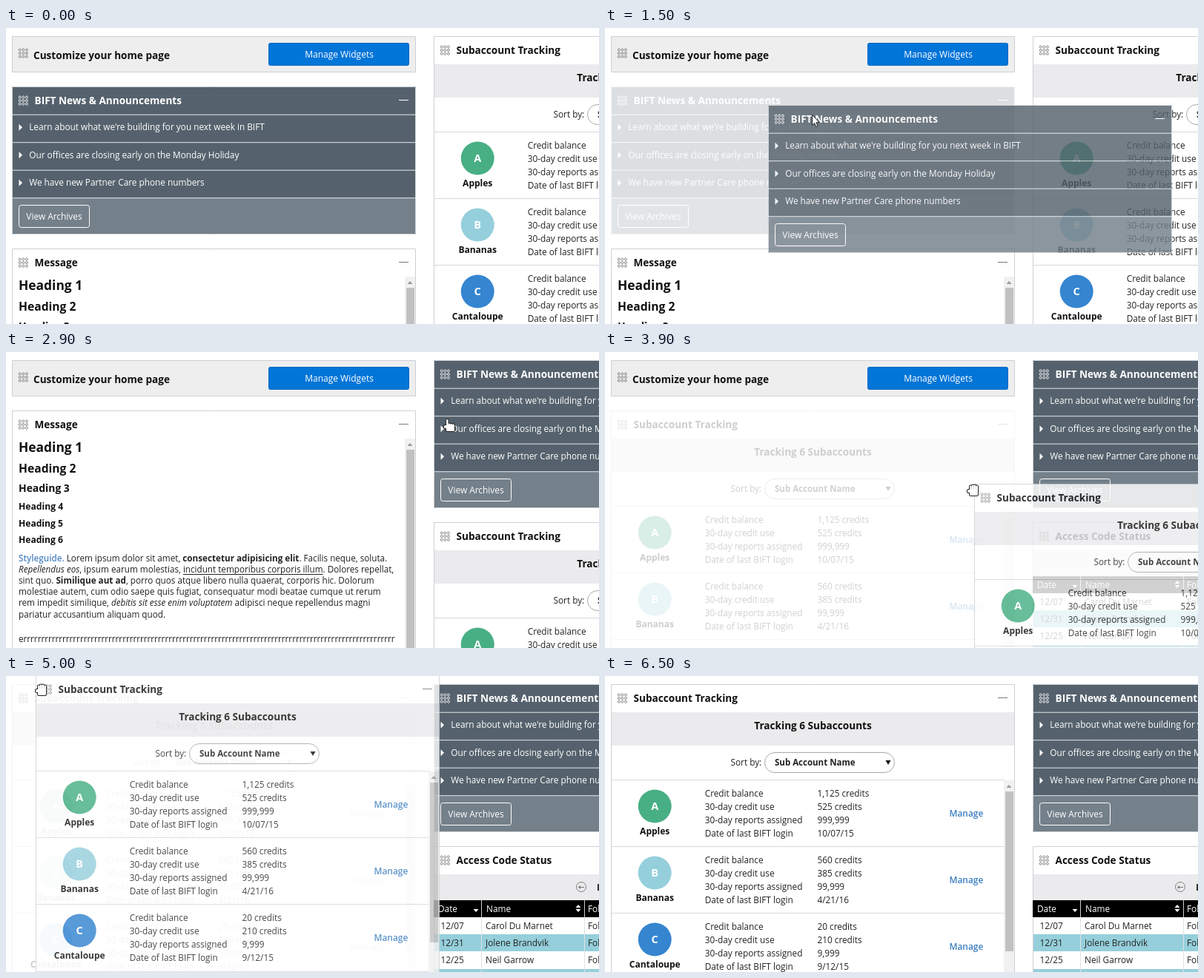
An HTML page with a canvas that plays this animation: 800 px wide and 400 px high, repeating every 6.9 s.

```html
<!DOCTYPE html>
<html lang="en">
<head>
<meta charset="utf-8">
<title>Dashboard widgets</title>
<style>
html, body { margin: 0; width: 100%; height: 100%; overflow: hidden; background: #fff; }
canvas { display: block; }
</style>
</head>
<body>
<canvas id="stage" width="800" height="400"></canvas>
<script>
const LOOP = 6900, STEP = 100, W = 545, GAP = 19, LEAD = 65;
const LEFT = 8, RIGHT = 577, TOP = 11;
const SLATE = '#55626d', BORDER = '#cdd0d4', BAND = '#ebebed', INK = '#222';
const stage = document.getElementById('stage').getContext('2d');
const layer = Object.assign(document.createElement('canvas'), { width: W, height: 460 }).getContext('2d');
let g = stage;

function rect(x, y, w, h, fill) {
  g.fillStyle = fill;
  g.fillRect(x, y, w, h);
}

function paint(fill, stroke, width = 1) {
  if (fill) { g.fillStyle = fill; g.fill(); }
  if (stroke) { g.strokeStyle = stroke; g.lineWidth = width; g.stroke(); }
}

function rounded(x, y, w, h, r, fill, stroke) {
  g.beginPath();
  g.roundRect(x + .5, y + .5, w - 1, h - 1, r);
  paint(fill, stroke);
}

function disc(x, y, r, fill, stroke) {
  g.beginPath();
  g.arc(x, y, r, 0, 7);
  paint(fill, stroke, .9);
}

function poly(points, fill, stroke) {
  g.beginPath();
  points.forEach(([x, y]) => g.lineTo(x, y));
  g.closePath();
  paint(fill, stroke);
}

// Arrowheads from base to tip; a negative length flips them.
const arrowV = (x, y, w, len, fill) => poly([[x - w / 2, y], [x + w / 2, y], [x, y + len]], fill);
const arrowH = (x, y, h, len, fill) => poly([[x, y - h / 2], [x, y + h / 2], [x + len, y]], fill);

function text(str, x, y, color = INK, size = 11.8, style = '', align = 'left') {
  g.font = `${style} ${size}px "Open Sans", "Noto Sans", sans-serif`;
  g.fillStyle = color;
  g.textAlign = align;
  g.fillText(str, x, y);
  return g.measureText(str).width;
}

const bold = (str, x, y, color = '#111', size = 13.6, align) => text(str, x, y, color, size, 'bold', align);

function box(h, fill) {
  rect(0, 0, W, h, fill);
  rounded(0, 0, W, h, 0, null, BORDER);
}

function grip(y, color) {
  for (let i = 0; i < 9; i++) disc(10.7 + i % 3 * 4.6, y + (i / 3 | 0) * 4.6, 1.5, null, color);
}

function panel(h, fill, title, ink = '#111', mark = '#777') {
  box(h, fill);
  grip(14.5, mark);
  bold(title, 30.5, 24, ink);
  rect(522, 18, 13, 1, mark);
}

function scrollbar(y, h, thumb) {
  rect(530, y, 14, h, '#f1f1f1');
  arrowV(537, y + 10, 7, -4, '#999');
  rect(532, y + 15, 11, thumb, '#c1c1c1');
}

function customize() {
  box(49, '#eeeeef');
  grip(18.5, '#777');
  bold('Customize your home page', 29, 31);
  rounded(346, 9, 190, 31, 2, '#0275d8', '#0269c2');
  text('Manage Widgets', 441.5, 29, '#fff', 12, '', 'center');
}

const ITEMS = [
  "Learn about what we're building for you next week in BIFT",
  'Our offices are closing early on the Monday Holiday',
  'We have new Partner Care phone numbers'
];

function news() {
  panel(200, SLATE, 'BIFT News & Announcements', '#fff', '#fff');
  rect(1, 151, W - 2, 48, '#74808a');
  rect(0, 150.2, W, 1, '#e4e7e9');
  ITEMS.forEach((item, i) => {
    const y = 37.7 + i * 37.5;
    rect(0, y, W, 1, '#e4e7e9');
    arrowH(9.5, y + 17.5, 9, 4.5, '#fff');
    text(item, 23.2, y + 21.3, '#fff');
  });
  rounded(9, 160, 96, 31, 3, null, '#fff');
  text('View Archives', 57, 180, '#fff', 11.9, '', 'center');
}

// A leading mark sets the style of a run.
const STYLES = { '#': '600', '*': 'bold', '/': 'italic', '_': '' };
const LOREM = [
  ['#Styleguide.', ' Lorem ipsum dolor sit amet, ', '*consectetur adipisicing elit', '. Facilis neque, soluta.'],
  ['/Repellendus eos', ', ipsum earum molestias, ', '_incidunt temporibus corporis illum', '. Dolores repellat,'],
  ['sint quo. ', '*Similique aut ad', ', porro quos atque libero nulla quaerat, corporis hic. Dolorum'],
  ['molestiae autem, cum odio saepe quis fugiat, consequatur modi beatae cumque ut rerum'],
  ['rem impedit similique, ', '/debitis sit esse enim voluptatem', ' adipisci neque repellendus magni'],
  ['pariatur accusantium aliquam quod.']
];

function message() {
  panel(420, '#fff', 'Message');
  for (let i = 0, y = 56; i < 6; i++) {
    const size = Math.max(12.1, 17.4 - 1.75 * i);
    bold('Heading ' + (i + 1), 9, y, '#111', size);
    y += size + 10.4;
  }
  LOREM.forEach((runs, i) => {
    let x = 9;
    const y = 204 + i * 15.1;
    for (const run of runs) {
      const mark = run[0], marked = mark in STYLES;
      const w = text(marked ? run.slice(1) : run, x, y, mark === '#' ? '#5186c2' : INK, 11.7, marked ? STYLES[mark] : '');
      if (mark === '_') rect(x, Math.round(y + 2), w, 1, INK);
      x += w;
    }
  });
  text('e' + 'r'.repeat(105), 9, 313, INK, 11.7);
  scrollbar(38, 381, 330);
}

const ACCOUNTS = [
  ['Apples', '#48af84', '1,125 credits', '525 credits', '999,999', '10/07/15'],
  ['Bananas', '#95cfdc', '560 credits', '385 credits', '99,999', '4/21/16'],
  ['Cantaloupe', '#3585d0', '20 credits', '210 credits', '9,999', '9/12/15']
];
const LABELS = ['Credit balance', '30-day credit use', '30-day reports assigned', 'Date of last BIFT login'];

function subaccounts() {
  panel(460, '#fff', 'Subaccount Tracking');
  rect(1, 38, W - 2, 45, BAND);
  bold('Tracking 6 Subaccounts', 272.5, 61, '#111', 13.6, 'center');
  text('Sort by:', 161.5, 110);
  rounded(207, 92, 176, 28, 14, '#fff', '#a9a9a9');
  bold('Sub Account Name', 221, 110, INK, 11.5);
  arrowV(374, 103, 7, 6, '#111');
  ACCOUNTS.forEach(([name, color, ...values], i) => {
    const y = 129 + i * 90;
    rect(1, y, 530, 1, '#d6d8dc');
    disc(59.2, y + 36, 22.5, color);
    bold(name[0], 59.2, y + 41, '#fff', 14.5, 'center');
    bold(name, 59.2, y + 74, '#111', 12, 'center');
    LABELS.forEach((label, k) => {
      text(label, 126.7, y + 23 + k * 17.9);
      text(values[k], 278.5, y + 23 + k * 17.9);
    });
    text('Manage', 456.5, y + 50, '#3b7fc0', 11.9, '600');
  });
  rect(1, 400, 530, 1, '#d6d8dc');
  scrollbar(130, 329, 216);
}

const CODES = [['12/07', 'Carol Du Marnet'], ['12/31', 'Jolene Brandvik'], ['12/25', 'Neil Garrow'], ['12/18', 'Wilma Tarrant']];

function accessCodes() {
  panel(300, '#fff', 'Access Code Status');
  rect(1, 38, W - 2, 35, BAND);
  disc(199, 55, 6.5, null, '#777');
  rect(196, 55, 7, 1, '#777');
  arrowH(198, 55.5, 5, -3, '#777');
  bold('Last 30 days', 220, 60, INK, 12);
  rect(0, 73, W, 23, '#000');
  text('Date', 6, 89, '#fff');
  text('Name', 71, 89, '#fff');
  text('Follow-up', 208, 89, '#fff');
  arrowV(57, 85, 7, 4, '#fff');
  arrowV(195, 83, 7, -4, '#fff');
  arrowV(195, 85, 7, 4, '#fff');
  CODES.forEach(([date, name], i) => {
    const y = Math.round(96 + i * 23.2);
    rect(1, y, W - 2, 23, i % 2 ? '#95cfdb' : '#fff');
    text(date, 9.5, y + 16);
    text(name, 70, y + 16);
    text('Follow up', 208, y + 16);
  });
  for (const x of [64, 203]) {
    rect(x, 73, 1, 23, '#ccc');
    rect(x, 96, 1, 92, '#dfe3e6');
  }
}

const HEIGHTS = new Map([[customize, 49], [news, 200], [message, 420], [subaccounts, 460], [accessCodes, 300]]);

const LAYOUTS = [
  { from: 0, left: [customize, news, message], right: [subaccounts, accessCodes] },
  { from: 2200, left: [customize, message], right: [news, subaccounts, accessCodes] },
  { from: 3900, left: [customize, subaccounts, message], right: [news, accessCodes] },
  { from: 4800, left: [subaccounts, customize, message], right: [news, accessCodes] }
];

// Key points are [time, x, y].
const DRAGS = [
  { widget: news, keys: [[1200, LEFT, 79], [1500, 220, 104], [1900, 471, 26], [2400, RIGHT, TOP]] },
  { widget: subaccounts, keys: [[3300, RIGHT, 230], [4500, 328, 84], [5000, 40, -1], [5500, LEFT, TOP]] }
];

const easeIn = k => k ** 1.5;
const easeOut = k => 1 - (1 - k) ** 1.5;
const GLIDES = [
  { from: 100, to: 850, a: [765, 362], b: [22, 97], ease: easeOut },
  { from: 2600, to: 3300, a: [591, 29], b: [591, 248], ease: easeIn, hand: true },
  { from: 5500, to: 6500, a: [22, 29], b: [806, 190], ease: easeOut }
];

// Smooth path through the keys without overshoot, at rest at both ends.
function along(keys, t) {
  const last = keys.length - 1;
  t = Math.min(t, keys[last][0]);
  const i = Math.min(last - 1, keys.findLastIndex(key => key[0] <= t));
  const span = keys[i + 1][0] - keys[i][0], s = (t - keys[i][0]) / span;
  const slope = (j, n) => (keys[j + 1][n] - keys[j][n]) / (keys[j + 1][0] - keys[j][0]);
  const tangent = (j, n) => {
    if (j === 0 || j === last) return 0;
    const a = slope(j - 1, n), b = slope(j, n);
    return a * b > 0 ? 2 * a * b / (a + b) : 0;
  };
  return [1, 2].map(n => Math.round(
    keys[i][n] + (keys[i + 1][n] - keys[i][n]) * s * s * (3 - 2 * s) +
    span * s * (1 - s) * (tangent(i, n) * (1 - s) - tangent(i + 1, n) * s)));
}

function arrow() {
  poly([[.5, .5], [.5, 14.5], [3.7, 11.5], [5.8, 16.5], [8, 15.5], [5.9, 10.7], [10.3, 10.7]], '#fff', INK);
}

// A dark pass one pixel wider gives the hand its outline.
function hand(fingerTop) {
  for (const [grow, fill] of [[1, INK], [0, '#fff']]) {
    g.beginPath();
    const part = (x, y, w, h) => g.roundRect(x - grow, y - grow, w + 2 * grow, h + 2 * grow, 1.5 + grow);
    for (let i = 0; i < 4; i++) part(3 + i * 2.8, fingerTop(i), 2.6, 8);
    part(3, 8, 11, 9);
    part(0, 9, 5, 4);
    paint(fill);
  }
}

const point = () => hand(i => i ? 6 + i * .5 : 1);

function grab() {
  g.translate(-7, -9);
  hand(i => 2 + Math.abs(i - 1.5));
}

function place(shape, x, y, alpha = 1) {
  if (alpha === 1) {
    g.save();
    g.translate(x, y);
    shape();
    g.restore();
    return;
  }
  layer.clearRect(0, 0, W, 460);
  g = layer;
  shape();
  g = stage;
  g.globalAlpha = alpha;
  g.drawImage(layer.canvas, x, y);
  g.globalAlpha = 1;
}

// The pointer runs ahead of the widget it drags.
function pointer(t, drag) {
  if (drag) {
    const [x] = along(drag.keys, t), [px, py] = along(drag.keys, t + LEAD);
    place(Math.abs(px - x) < 26 ? grab : arrow, px + 14, py + 18);
    return;
  }
  const glide = GLIDES.findLast(gl => t >= gl.from);
  if (!glide) return;
  const k = glide.ease(Math.min(1, (t - glide.from) / (glide.to - glide.from)));
  const [x, y] = glide.a.map((v, n) => Math.round(v + (glide.b[n] - v) * k));
  place(glide.hand ? point : arrow, x, y);
}

function draw(t) {
  rect(0, 0, 800, 400, '#fff');
  const drag = DRAGS.find(({ keys }) => t >= keys[0][0] && t < keys.at(-1)[0] + STEP * 2 && t < keys.at(-1)[0]);
  const layout = LAYOUTS.findLast(l => t >= l.from);
  for (const [column, x] of [[layout.left, LEFT], [layout.right, RIGHT]]) {
    let y = TOP;
    for (const widget of column) {
      if (y < 400) place(widget, x, y, drag?.widget === widget ? .2 : 1);
      y += HEIGHTS.get(widget) + GAP;
    }
  }
  if (drag) place(drag.widget, ...along(drag.keys, t), .82);
  pointer(t, drag);
}

const start = performance.now();
function tick() {
  const t = (performance.now() - start) % LOOP;
  draw(Math.floor(t / STEP) * STEP);
  requestAnimationFrame(tick);
}
tick();
</script>
</body>
</html>
```
